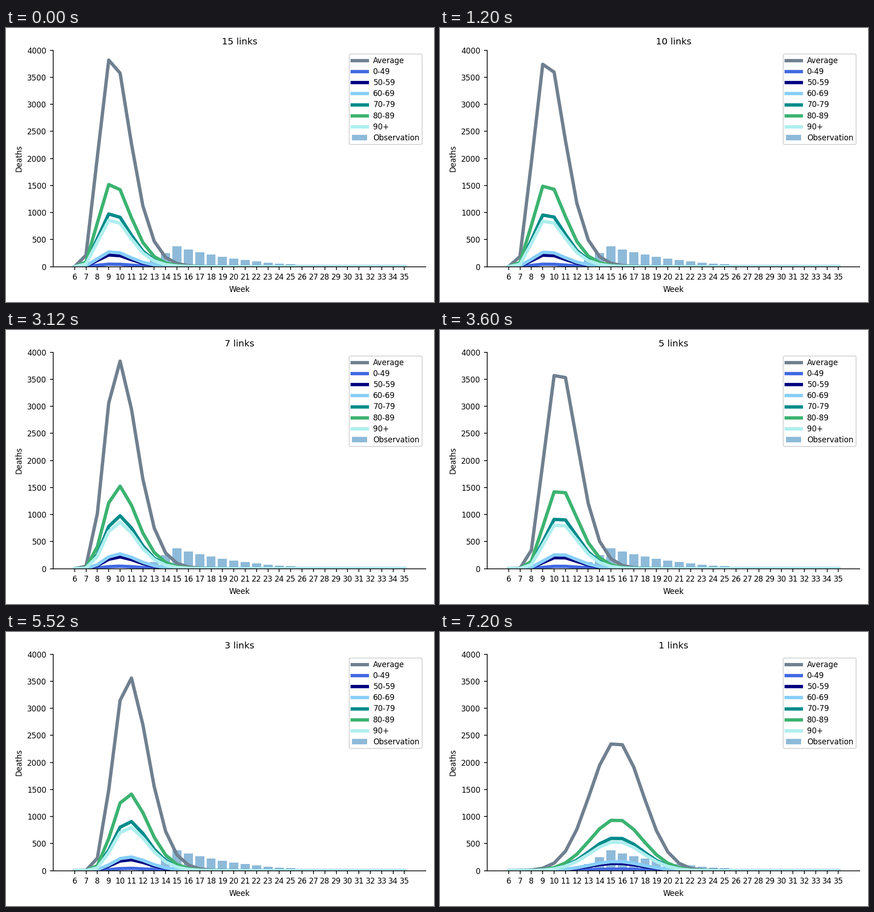
Animation of 934 by 600 pixels, one loop 8400 ms. Source, as a matplotlib script:

```python
import matplotlib.pyplot as plt
import numpy as np
from matplotlib.animation import FuncAnimation

WIDTH, HEIGHT, DPI = 934, 600, 150
LEFT, RIGHT, TOP, BOTTOM = 102.8, 916.4, 48.8, 522.6   # plot area in pixels

plt.rcParams.update({"font.family": "DejaVu Sans", "font.size": 8})

weeks = np.arange(6, 36)
observed_weeks = np.arange(13, 26)

# label, colour, share of the average curve
GROUPS = [
    ("Average", "slategray", 1),
    ("0-49", "royalblue", 0.012),
    ("50-59", "navy", 0.0568),
    ("60-69", "lightskyblue", 0.071),
    ("70-79", "darkcyan", 0.255),
    ("80-89", "mediumseagreen", 0.3975),
    ("90+", "paleturquoise", 0.2242),
]

# links, peak deaths, peak week, spread, onset (a distant onset is symmetric)
SCENARIOS = [
    (15, 3955, 9.35, 1.37, 5.9),
    (10, 3915, 9.40, 1.38, 5.9),
    (7, 3850, 9.88, 1.41, 5.9),
    (5, 3770, 10.46, 1.44, 6.0),
    (3, 3607, 10.75, 1.52, 5.9),
    (2, 3403, 11.55, 1.60, 5.9),
    (1, 2390, 15.47, 2.30, -1000),
]


def wave(peak, center, spread, onset):
    """Weekly deaths as a gamma-shaped outbreak starting at onset."""
    lead = center - onset
    v = (weeks - onset) / lead
    return peak * np.exp((lead / spread) ** 2 * (np.log(v) - v + 1))


def observed(week):
    """Linear rise to week 15, then an accelerating decay."""
    n = week - 15
    return np.minimum(125 * (week - 12), 375 * np.exp(-0.155 * n - 0.006 * n**2))


fig = plt.figure(figsize=(WIDTH / DPI, HEIGHT / DPI), dpi=DPI, facecolor="white")
ax = fig.add_axes([LEFT / WIDTH, 1 - BOTTOM / HEIGHT,
                   (RIGHT - LEFT) / WIDTH, (BOTTOM - TOP) / HEIGHT])

ax.bar(observed_weeks, observed(observed_weeks), color="tab:blue", alpha=0.5,
       label="Observation")
lines = [ax.plot(weeks, 0 * weeks, color=color, lw=3.5, label=label)[0]
         for label, color, _ in GROUPS]

ax.set_xlim(4.11, 36.89)
ax.set_ylim(0, 4000)
ax.set_xticks(weeks)
ax.set_xlabel("Week")
ax.set_ylabel("Deaths")
ax.spines[["top", "right"]].set_visible(False)
ax.legend(loc="upper right", borderpad=0.335, labelspacing=0.37)
title = ax.set_title("")


def update(i):
    links, *shape = SCENARIOS[i]
    average = wave(*shape)
    for line, (_, _, share) in zip(lines, GROUPS):
        line.set_ydata(average * share)
    title.set_text(f"{links} links")
    return [*lines, title]


anim = FuncAnimation(fig, update, frames=len(SCENARIOS), interval=1200,
                     repeat=True, repeat_delay=0, blit=False)
plt.show()
```
